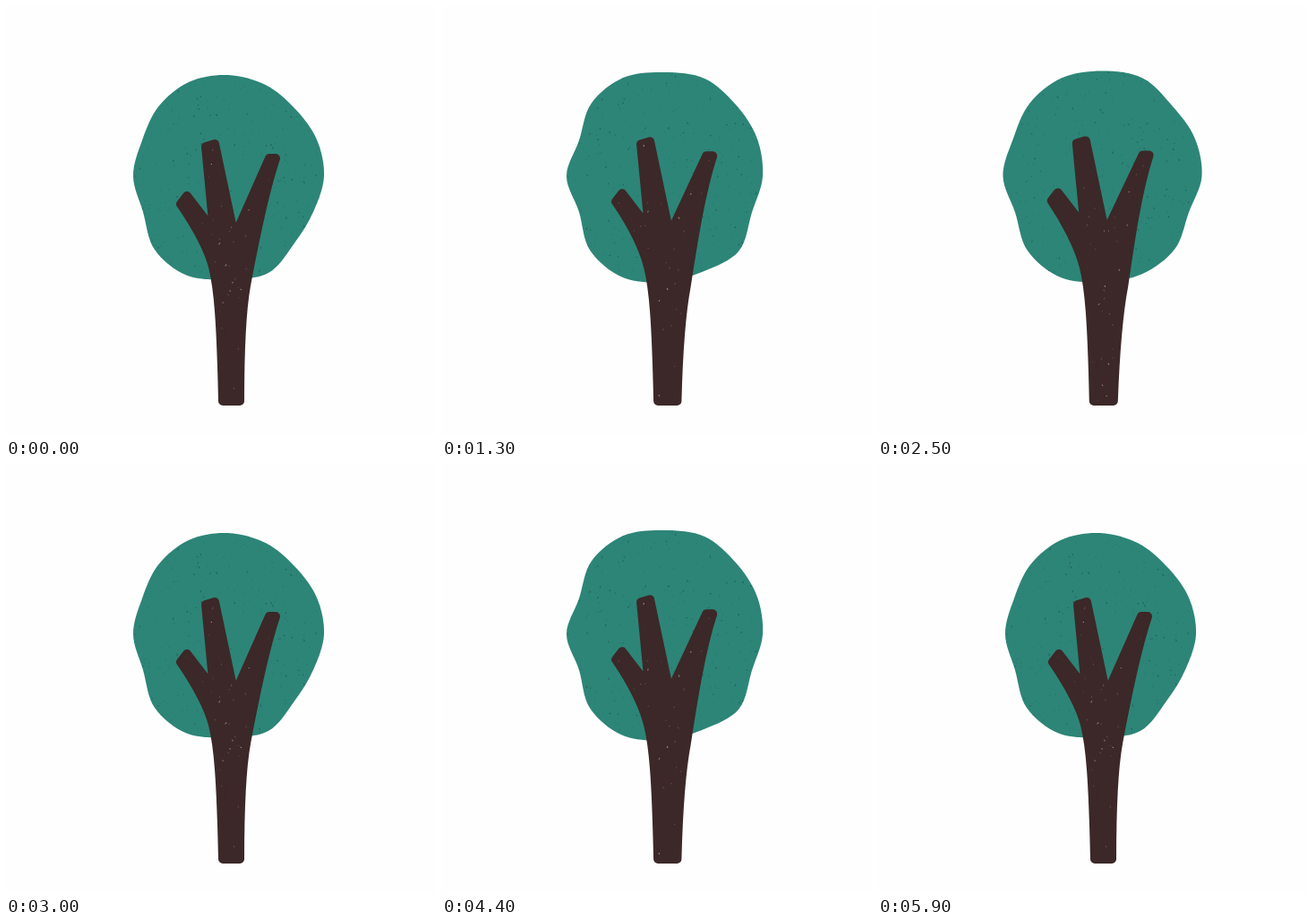
Recreate the animation shown at these times as an HTML page. Size 480 px wide and 480 px high, loop 6000 ms.

```html
<!DOCTYPE html>
<html lang="en">
<head>
<meta charset="utf-8">
<title>Tree</title>
<style>
  html, body { margin: 0; width: 100%; height: 100%; overflow: hidden; background: #fefefe; }
  svg { display: block; width: 100%; height: 100%; }
  .crown { fill: #2d8577; }
  .trunk { fill: #3c2828; stroke: #3c2828; stroke-width: 10; stroke-linejoin: round; }
  .specks { fill: none; stroke-linecap: round; }
</style>
</head>
<body>
<svg id="stage" viewBox="0 0 480 480"></svg>
<script>
const stage = document.getElementById('stage');
const BEAT = 100;
const CENTER = [248, 190];

// Crown radii at even angles, clockwise from the top.
const calm = [113, 110, 106, 107, 107, 103, 105, 117, 115, 120, 116, 103, 106, 104, 110, 114];
const wavy = [116, 118, 113, 112, 110, 106, 118, 115, 118, 122, 117, 103, 109, 103, 115, 119];
const wide = [119, 119, 109, 112, 113, 104, 112, 121, 118, 122, 118, 107, 112, 112, 114, 118];
const blend = (a, b) => a.map((r, i) => (r + b[i]) / 2);

// grow swells the trunk, lean shifts the crown sideways.
const poses = [
  { radii: calm, grow: 0, lean: 0 },
  { radii: blend(calm, wavy), grow: 0.3, lean: -3 },
  { radii: wavy, grow: 0.6, lean: 0 },
  { radii: blend(wavy, wide), grow: 0.8, lean: 2 },
  { radii: wide, grow: 1, lean: 0 }
];

// Beats that each pose is held, one group per sway.
const holds = [...'13131 22223 13123 13122 32122 32122 1'.replaceAll(' ', '')].map(Number);
const totalBeats = holds.reduce((a, b) => a + b);

// Trunk core; its round-joined stroke gives soft tips and sharp forks.
const core = 'M242 441L261 441C261 375 263 340 268 312C275 275 286 215 301 170L294 170' +
  'L255 258L233 154L223 157L232 251L202 212L195 221C210 243 225 268 231 291C237 315 240 350 242 441Z';

function trunkPath(grow) {
  return core.replace(/(\d+) (\d+)/g, (_, x, y) => {
    const bulge = Math.exp(-(((y - 320) / 70) ** 2));
    const spread = x > 260 ? 2 + 6 * bulge : -1.5;
    const lift = y < 262 ? 4.5 : 0;
    return `${(+x + grow * spread).toFixed(1)} ${(y - grow * lift).toFixed(1)}`;
  });
}

// Closed Catmull-Rom curve through the ends of the radii.
function crownPath({ radii, lean }) {
  const n = radii.length;
  const pts = radii.map((r, i) => {
    const a = i / n * 2 * Math.PI;
    return [CENTER[0] + lean + r * Math.sin(a), CENTER[1] - r * Math.cos(a)];
  });
  const at = i => pts[(i + n) % n];
  const handle = (i, sign) => at(i).map((v, k) => v + sign * (at(i + 1)[k] - at(i - 1)[k]) / 6);
  return 'M' + pts[0] + pts.map((_, i) =>
    'C' + [handle(i, 1), handle(i + 1, -1), at(i + 1)].join(' ')).join('') + 'Z';
}

function random(seed) {
  return () => (seed = seed * 16807 % 2147483647) / 2147483647;
}

function specks(rand, count, [x, y, w, h]) {
  let d = '';
  for (let i = 0; i < count; i++) {
    d += `M${x + rand() * w} ${y + rand() * h}l${rand() * 1.6 - 0.8} ${rand() * 1.4}`;
  }
  return d;
}

const crownBox = [134, 71, 230, 238], trunkBox = [188, 145, 122, 302];

function drawPose(pose, index) {
  const rand = random(7919 * (index + 3));
  const shape = (part, d) =>
    `<clipPath id="${part}${index}"><path d="${d}"/></clipPath><path class="${part}" d="${d}"/>`;
  const grain = (part, color, width, count, box) =>
    `<path class="specks" clip-path="url(#${part}${index})" stroke="${color}" stroke-width="${width}" d="${specks(rand, count, box)}"/>`;
  return '<g>' + shape('crown', crownPath(pose)) +
    grain('crown', '#24746a', 0.9, 220, crownBox) +
    grain('crown', '#1f655c', 1.2, 80, crownBox) +
    shape('trunk', trunkPath(pose.grow)) +
    grain('trunk', '#6f5856', 0.8, 90, trunkBox) +
    grain('trunk', '#a8938f', 1, 30, trunkBox) + '</g>';
}

stage.innerHTML = poses.map(drawPose).join('');
const groups = [...stage.children];

function render(ms) {
  let left = ms / BEAT % totalBeats;
  let step = 0;
  while (left >= holds[step]) left -= holds[step++];
  groups.forEach((g, i) => g.setAttribute('display', i === step % poses.length ? 'inline' : 'none'));
}

const begin = performance.now();
function tick() {
  render(performance.now() - begin);
  requestAnimationFrame(tick);
}
tick();
</script>
</body>
</html>
```
